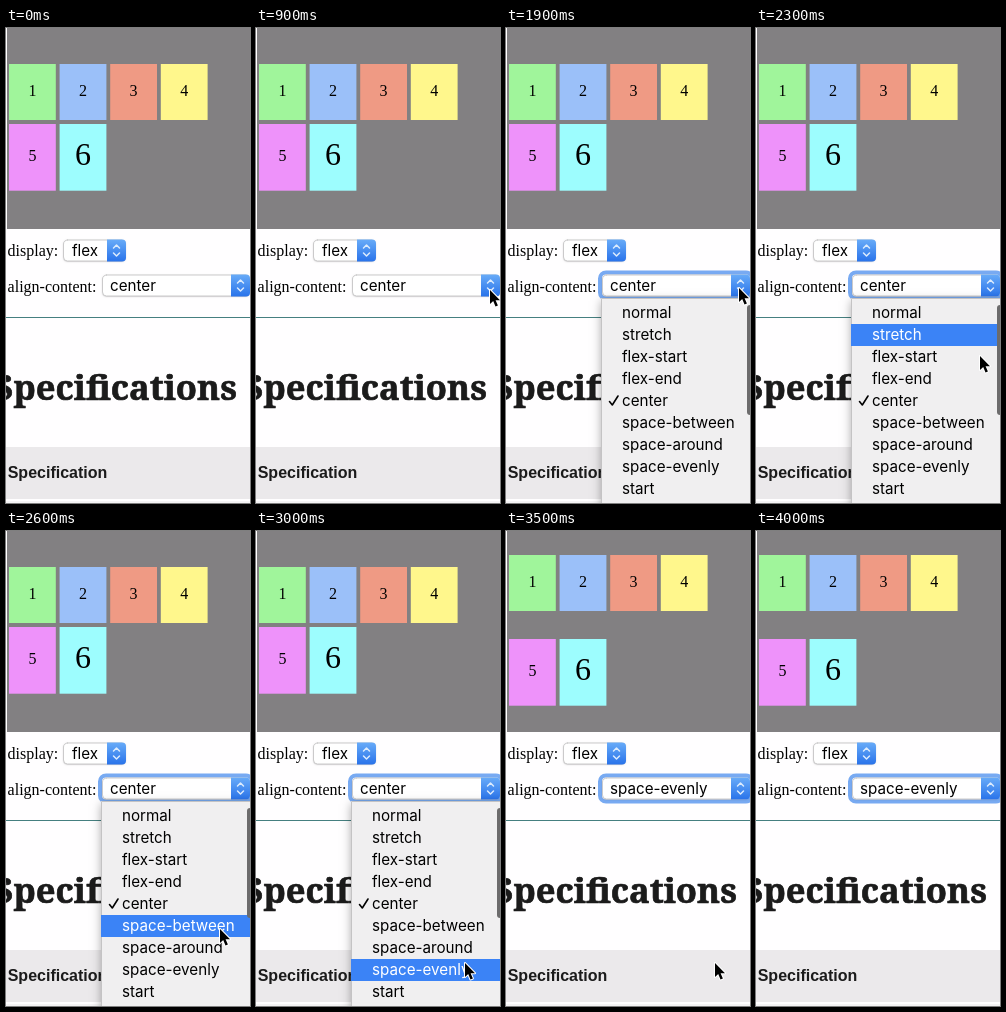
An HTML page with a canvas that plays this animation: 244x475 px, repeating every 4900 ms.

```html
<!DOCTYPE html>
<html lang="en">
<head>
<meta charset="utf-8">
<title>align-content demo</title>
<style>
  html, body { margin: 0; width: 100%; height: 100%; overflow: hidden; background: #fffeff; }
  canvas { display: block; width: 244px; height: 475px; }
</style>
</head>
<body>
<canvas id="stage"></canvas>
<script>
const W = 244, H = 475, LOOP = 4900, STEP = 100;
const canvas = document.getElementById('stage');
const ctx = canvas.getContext('2d');
const dpr = window.devicePixelRatio || 1;
canvas.width = W * dpr;
canvas.height = H * dpr;

const SERIF = '"Liberation Serif", "Times New Roman", serif';
const SANS = '"Liberation Sans", Arial, sans-serif';
const SLAB = '"Noto Serif", serif';
const UI = '15.2px Inter, Roboto, sans-serif';

const OPTIONS = ['normal', 'stretch', 'flex-start', 'flex-end', 'center',
  'space-between', 'space-around', 'space-evenly', 'start'];
const ROW = 22, MENU_X = 95, MENU_Y = 270, FIRST_ROW = 274;
const COLORS = ['#a0f59b', '#9bc0f9', '#ef9a84', '#fff78c', '#ee92fa', '#9dfdfe'];

const FOCUS = 1200, OPEN = 1900, BLINK = 3300, CLOSE = 3500;

// enter, press, travel down the list, leave
const MOVES = [
  { from: 0, time: 200, dx: -8, dy: -18 },
  { from: 900, time: 100, dx: -1, dy: -2 },
  { from: 2100, time: 900, dx: -24, dy: 172 },
  { from: 3700, time: 300, dx: 40, dy: -28 }
];

function pointerAt(t) {
  return MOVES.reduce(([x, y], m) => {
    const p = Math.min(1, Math.max(0, (t - m.from) / m.time));
    const eased = 1 - (1 - p) ** 2;
    return [x + m.dx * eased, y + m.dy * eased];
  }, [242, 280]);
}

// the highlight trails slightly behind the pointer
function activeRow(t) {
  if (t >= BLINK && t < BLINK + STEP) return -1;
  return Math.floor((pointerAt(t - 50)[1] - FIRST_ROW) / ROW);
}

function rect(x, y, w, h, fill) {
  ctx.fillStyle = fill;
  ctx.fillRect(x, y, w, h);
}

function round(x, y, w, h, r) {
  ctx.beginPath();
  ctx.roundRect(x, y, w, h, r);
}

function text(str, x, y, font, fill = '#000', align = 'left') {
  ctx.font = font;
  ctx.fillStyle = fill;
  ctx.textAlign = align;
  ctx.fillText(str, x, y);
}

function line(points, color, width) {
  ctx.beginPath();
  points.forEach(([x, y]) => ctx.lineTo(x, y));
  ctx.strokeStyle = color;
  ctx.lineWidth = width;
  ctx.lineCap = ctx.lineJoin = 'round';
  ctx.stroke();
}

function tiles(evenly) {
  rect(1, 0, W - 1, 201, '#828082');
  const heights = [56, 66.7];
  const gap = evenly ? 28 : 4;
  const top = evenly ? 24 : 36;
  COLORS.forEach((color, i) => {
    const row = Math.floor(i / 4);
    const x = 3 + (i % 4) * 50.6;
    const y = top + row * (heights[0] + gap);
    const size = i === 5 ? 32 : 16;
    rect(x, y, 46.8, heights[row], color);
    text(String(i + 1), x + 23.4, y + heights[row] / 2 + size / 4,
      `${size}px ${SERIF}`, '#000', 'center');
  });
}

function select(x, y, w, label, textX) {
  const h = 22, bx = x + w - 19, mid = bx + 9.5;
  ctx.save();
  ctx.shadowColor = 'rgba(0,0,0,.28)';
  ctx.shadowBlur = 1.5 * dpr;
  ctx.shadowOffsetY = 0.5 * dpr;
  round(x + 0.5, y + 0.5, w - 1, h - 1, 4);
  ctx.fillStyle = '#fff';
  ctx.fill();
  ctx.restore();
  ctx.strokeStyle = '#cbcacb';
  ctx.lineWidth = 1;
  ctx.stroke();

  const blue = ctx.createLinearGradient(0, y, 0, y + h);
  blue.addColorStop(0, '#68abf8');
  blue.addColorStop(1, '#2973ea');
  round(bx, y, 19, h, [0, 4, 4, 0]);
  ctx.fillStyle = blue;
  ctx.fill();
  for (const dir of [-1, 1]) {
    const cy = y + h / 2 + dir * 2.5;
    line([[mid - 3, cy], [mid, cy + dir * 3], [mid + 3, cy]], '#dcebfd', 1.5);
  }
  text(label, textX, y + 16.5, UI);
}

function ring(soft) {
  const grow = soft ? 3 : 2;
  round(96 - grow, 246.5 - grow, 148 + 2 * grow, 22 + 2 * grow, 4 + grow);
  ctx.strokeStyle = soft ? 'rgba(80,150,245,.4)' : '#78aaf2';
  ctx.lineWidth = soft ? 5 : 4;
  ctx.stroke();
}

function menu(active) {
  ctx.save();
  ctx.shadowColor = 'rgba(0,0,0,.32)';
  ctx.shadowBlur = 9 * dpr;
  ctx.shadowOffsetY = 3 * dpr;
  rect(MENU_X, MENU_Y, 170, 230, '#f0eff0');
  ctx.restore();
  line([[W + 2, MENU_Y + 0.5], [MENU_X + 0.5, MENU_Y + 0.5], [MENU_X + 0.5, H + 2]], '#c4c3c4', 1);

  OPTIONS.forEach((name, i) => {
    const y = FIRST_ROW + i * ROW;
    const ink = i === active ? '#fff' : '#000';
    if (i === active) rect(MENU_X, y, W - MENU_X, ROW, '#3b83f6');
    text(name, 116, y + 16.3, UI, ink);
    if (name === 'center') line([[103.5, y + 11.5], [106.3, y + 15], [112, y + 6]], ink, 1.6);
  });

  round(241, 277, 7, 110, 3);
  ctx.fillStyle = '#6c6b6c';
  ctx.fill();
}

function pointer([x, y]) {
  ctx.save();
  ctx.translate(Math.round(x), Math.round(y));
  ctx.beginPath();
  [[0, 0], [0, 14], [3.2, 11.1], [5.5, 16.5], [7.9, 15.5], [5.6, 10.2], [10, 10.2]]
    .forEach(([px, py]) => ctx.lineTo(px, py));
  ctx.closePath();
  ctx.lineJoin = 'round';
  ctx.strokeStyle = '#fff';
  ctx.lineWidth = 2;
  ctx.stroke();
  ctx.fillStyle = '#000';
  ctx.fill();
  ctx.restore();
}

function heading() {
  text('Specifications', 231, 372, `bold 34.6px ${SLAB}`, '#1b1b1b', 'right');
  ctx.strokeStyle = '#1b1b1b';
  ctx.lineWidth = 0.7;
  ctx.strokeText('Specifications', 231, 372);
}

function draw(t) {
  const evenly = t >= CLOSE;
  ctx.setTransform(dpr, 0, 0, dpr, 0, 0);
  rect(0, 0, W, H, '#fffeff');

  tiles(evenly);
  text('display:', 1.6, 228, `16px ${SERIF}`);
  text('align-content:', 1.6, 264, `16px ${SERIF}`);
  rect(0, 289, W, 1, '#457f80');
  heading();
  rect(0, 419, W, 52, '#ebe9eb');
  rect(0, 473, W, 2, '#f4f3f4');
  text('Specification', 1.7, 450, `bold 16px ${SANS}`, '#1b1b1b');

  select(57, 211.5, 63, 'flex', 66);
  if (t >= FOCUS) ring(t < FOCUS + STEP);
  select(96, 246.5, 148, evenly ? 'space-evenly' : 'center', 104);
  if (t >= OPEN && t < CLOSE) menu(activeRow(t));
  if (t >= 100 && t < 4000) pointer(pointerAt(t));
}

const start = performance.now();
function tick(now) {
  const t = Math.max(0, now - start) % LOOP;
  draw(Math.floor(t / STEP) * STEP);
  requestAnimationFrame(tick);
}
draw(0);
requestAnimationFrame(tick);
</script>
</body>
</html>
```
